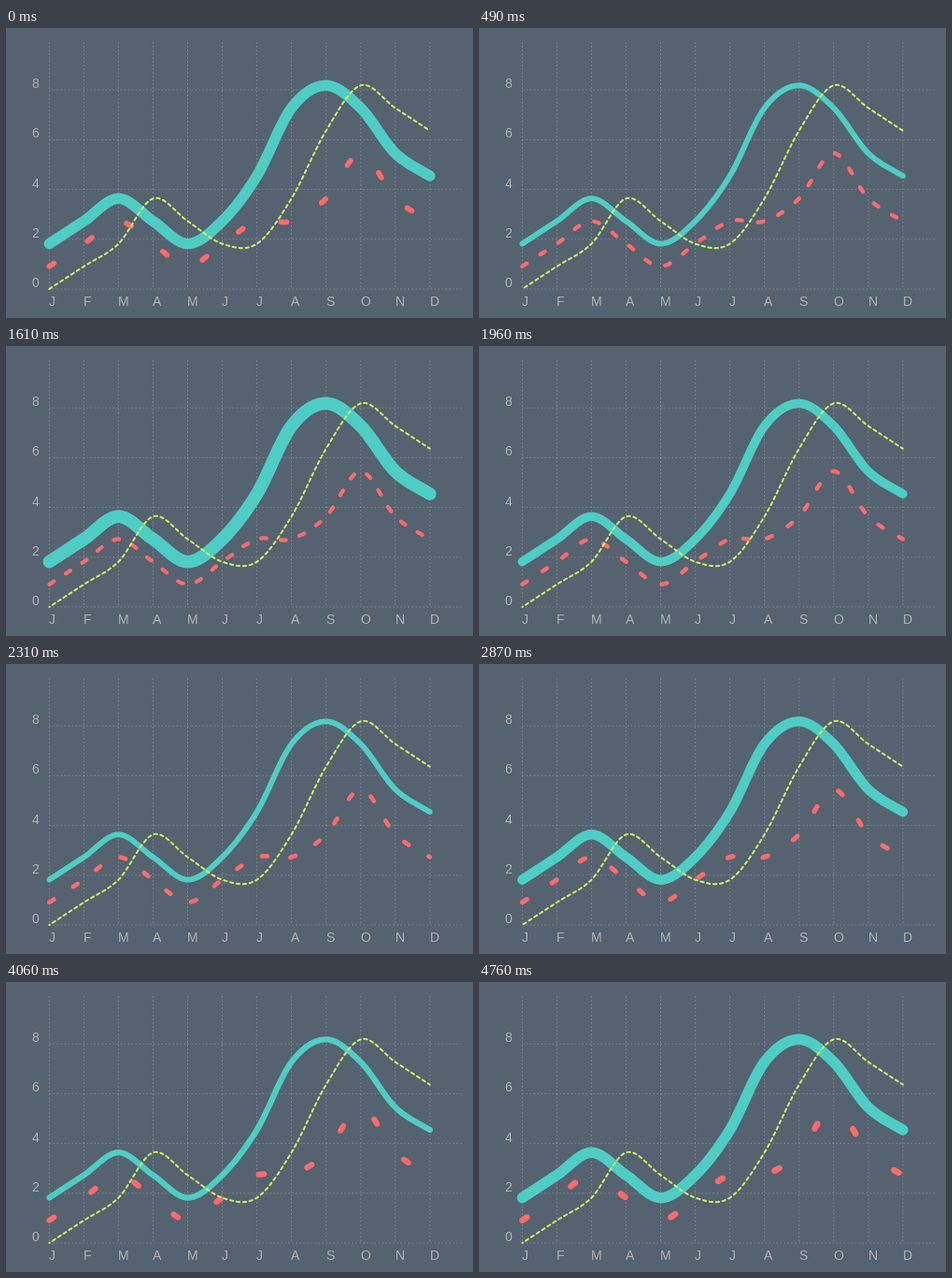
These frames come from a looping animation (500 px wide and 310 px high, 4830 ms). A matplotlib script:

```python
import math

import matplotlib.pyplot as plt
from matplotlib.animation import FuncAnimation
from matplotlib.patches import PathPatch
from matplotlib.path import Path

W, H, DPI = 500, 310, 100
FRAMES, STEP = 69, 70
PX = 72 / DPI                      # points per pixel

X0, DX = 46.3, 37.05               # first month, month spacing
BASE, UNIT, TICK = 279, 24.18, 53.2
TOP, RIGHT = 15, 490

BACK, TEAL, RED, LIME = "#556270", "#4ecdc4", "#ff6b6b", "#c7f464"
LABEL = "#b0b4b4"

plt.rcParams["lines.scale_dashes"] = False
plt.rcParams["path.simplify"] = False
plt.rcParams["toolbar"] = "None"

fig = plt.figure(figsize=(W / DPI, H / DPI), dpi=DPI, facecolor=BACK)
ax = fig.add_axes([0, 0, 1, 1])
ax.set_xlim(0, W)
ax.set_ylim(H, 0)
ax.axis("off")


def dashes(on, off, shift=0):
    return shift * PX, (on * PX, off * PX)


def smooth(values):
    """Catmull-Rom curve through the monthly values, as Bezier segments."""
    pts = [(X0 + i * DX, BASE - v * UNIT) for i, v in enumerate(values)]
    ends = [pts[0]] + pts + [pts[-1]]
    verts, codes = [pts[0]], [Path.MOVETO]
    for a, b, c, d in zip(ends, ends[1:], ends[2:], ends[3:]):
        verts.append(tuple(q + (r - p) / 6 for p, q, r in zip(a, b, c)))
        verts.append(tuple(q - (r - p) / 6 for p, q, r in zip(b, c, d)))
        verts.append(c)
        codes += [Path.CURVE4] * 3
    return Path(verts, codes)


def series(values, color, width, z):
    line = PathPatch(smooth(values), fill=False, edgecolor=color,
                     linewidth=width * PX, capstyle="round",
                     joinstyle="round", zorder=z, snap=False)
    return ax.add_patch(line)


def grid(xs, ys):
    ax.plot(xs, ys, color="white", alpha=0.2, linewidth=PX, snap=False,
            linestyle=dashes(2, 2), dash_capstyle="butt", zorder=1)


def label(x, y, text):
    ax.text(x, y, text, color=LABEL, fontsize=14 * PX,
            family="Liberation Sans", ha="left", va="baseline", zorder=2)


for i, month in enumerate("JFMAMJJASOND"):
    x = X0 + i * DX
    grid([x, x], [TOP, BASE])
    label(x - 0.3, 297, month)

for i in range(5):
    y = BASE - i * TICK
    grid([X0, RIGHT], [y, y])
    label(27.6, y - 2, str(2 * i))

teal = series([2, 3, 4, 3, 2, 3, 5, 8, 9, 8, 6, 5], TEAL, 10, 3)
red = series([1, 2, 3, 2, 1, 2, 3, 3, 4, 6, 4, 3], RED, 5, 4)
lime = series([0, 1, 2, 4, 3, 2, 2, 4, 7, 9, 8, 7], LIME, 2, 5)


def draw(n):
    t = n * STEP
    # thick line swells and shrinks
    swell = math.cos(2 * math.pi * (t - 1470) / 1820)
    teal.set_linewidth((10 + 4.2 * swell) * PX)

    # dashes close up four times faster than they spread apart
    pitch = max(49.1 - 0.0533 * t, 0.0135 * t - 0.74)
    red.set_linewidth((3 + 0.056 * pitch) * PX)
    red.set_linestyle(dashes(6, pitch - 6))

    # thin dashes march forward
    lime.set_linestyle(dashes(3.5, 3.5, -0.02 * t % 7))
    return teal, red, lime


anim = FuncAnimation(fig, draw, frames=FRAMES, interval=STEP,
                     init_func=lambda: draw(0), repeat=True, repeat_delay=0)
plt.show()
```
